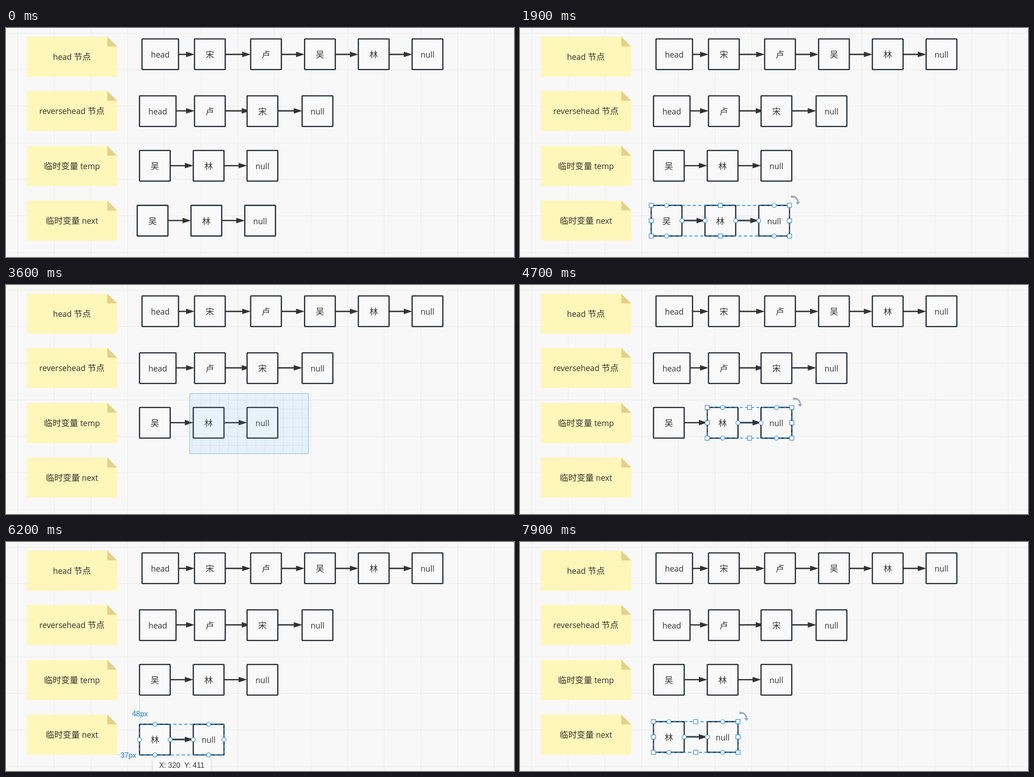
Recreate the animation shown at these times as an HTML page. Size 1113 by 503 pixels, loop 8000 ms.

```html
<!DOCTYPE html>
<html lang="zh">
<head>
<meta charset="utf-8">
<title>Linked list reversal</title>
<style>
  html, body { margin: 0; width: 100%; height: 100%; overflow: hidden; background: #f8f8f8; }
  svg { display: block; }
  text { fill: #323232; text-anchor: middle; white-space: pre;
         font: 17.5px "Open Sans", "Noto Sans", sans-serif; }
  .cjk { font: 300 18.7px "Noto Sans CJK SC", "Noto Sans CJK", sans-serif; }
  .ui { font: 16px "Liberation Sans", Arial, sans-serif; }
  .gap { fill: #0a7fe5; stroke: #f8f8f8; stroke-width: 3; paint-order: stroke; }
  .node { fill: #f9f9f9; stroke: #1e2a35; stroke-width: 2.6; stroke-linejoin: round; }
  .line { stroke: #323232; stroke-width: 2.8; }
  .head { fill: #323232; }
  .glow { stroke: #b3d5f8; stroke-width: 5; }
  .knob { fill: #fff; stroke: #1585e8; stroke-width: 1.2; }
  .dash { fill: none; stroke: #1585e8; stroke-width: 1.6; stroke-dasharray: 7 5; }
  .guide { stroke: #7fa9d2; stroke-width: 1; stroke-dasharray: 2 2; }
  .grid { fill: none; stroke: #e9e9e9; }
  .fine { fill: none; stroke: #e4e4e4; }
  .marquee { fill: rgba(60, 185, 255, .1); stroke: #74b4ec; }
  .turn { fill: none; stroke: #95a5bd; stroke-width: 3; }
  .tip { fill: #95a5bd; }
</style>
</head>
<body>
<svg width="1113" height="503" viewBox="0 0 1113 503">
  <defs>
    <filter id="soft" x="-20%" y="-40%" width="140%" height="180%">
      <feDropShadow dx="0" dy="1" stdDeviation="3" flood-color="#000" flood-opacity=".16"/>
    </filter>
  </defs>
  <rect width="1113" height="503" fill="#f8f8f8"/>
  <g id="grid"></g>
  <g id="under"></g>
  <g id="fixed"></g>
  <g id="scene"></g>
</svg>
<script>
const LOOP = 8000, STEP = 100, SIZE = 67.3, PITCH = 117.8, SCALE = 4 / 3;
const CELL = 80.35, ORIGIN = { x: 25.4, y: 11 };
const TEMP = { x: 292.5, y: 269 }, NEXT = { x: 287.5, y: 389.6 };
const TAIL = { x: TEMP.x + PITCH, y: TEMP.y };
const NOTE = { x: 45.5, w: 198, h: 88 };
const layer = id => document.getElementById(id);

// ---- drawing helpers ----
const line = (cls, x1, y1, x2, y2) =>
  `<line class="${cls}" x1="${x1}" y1="${y1}" x2="${x2}" y2="${y2}"/>`;
const rect = (cls, x, y, w, h, extra = '') =>
  `<rect class="${cls}" x="${x}" y="${y}" width="${w}" height="${h}" ${extra}/>`;
const knob = (x, y) => `<circle class="knob" cx="${x}" cy="${y}" r="4.6"/>`;
const handle = (x, y) => rect('knob', x - 4.6, y - 4.6, 9.2, 9.2);

function label(str, x, y) {
  const parts = str.replace(/[\u4e00-\u9fff]+/g, s => `<tspan class="cjk">${s}</tspan>`);
  return `<text x="${x}" y="${y}">${parts}</text>`;
}

function arrow(x1, x2, y, glow) {
  return (glow ? line('glow', x1, y, x2 - 4, y) : '') +
    line('line', x1, y, x2 - 16, y) +
    `<path class="head" d="M${x2} ${y}l-18.5 -6v12z"/>`;
}

const node = (str, x, y, w = SIZE) =>
  rect('node', x, y, w, SIZE, 'rx="1"') + label(str, x + w / 2, y + 41);

function note(str, y) {
  const { x, w, h } = NOTE, f = 21.5, r = x + w;
  return `<path fill="#fff6b9" d="M${x} ${y}H${r - f}L${r} ${y + f}V${y + h}H${x}z"/>` +
    `<path fill="#e5d088" d="M${r - f} ${y}V${y + f}H${r}z"/>` +
    label(str, x + w / 2, y + 51);
}

function chain(names, { x, y }, glow) {
  const at = i => x + i * PITCH;
  const links = names.slice(1).map((_, i) =>
    arrow(at(i) + SIZE, at(i + 1), y + SIZE / 2 - .3, glow));
  return links.join('') + names.map((n, i) => node(n, at(i), y)).join('');
}

const anchors = (x, y, w, h) =>
  knob(x + w / 2, y) + knob(x + w / 2, y + h) + knob(x, y + h / 2) + knob(x + w, y + h / 2);

const turnIcon = (x, y) => `<g transform="translate(${x} ${y})">` +
  '<path class="turn" d="M6 -19.5A12 12 0 0 1 18.5 -6"/>' +
  '<path class="tip" d="M3 -16.5l1 -6.5l5.5 6z"/>' +
  '<path class="tip" d="M13.5 -7.5l10 .5l-5.5 5.5z"/></g>';

function selection(count, { x, y }, phase, handles) {
  const w = (count - 1) * PITCH + SIZE, h = SIZE;
  let out = rect('dash', x, y, w, h, `stroke-dashoffset="${-phase}"`);
  for (let i = 0; i < count; i++) out += anchors(x + i * PITCH, y, SIZE, h);
  if (!handles) return out;
  for (const i of [0, .5, 1])
    for (const j of [0, .5, 1])
      if (i !== .5 || j !== .5) out += handle(x + w * i, y + h * j);
  return out + turnIcon(x + w, y);
}

function dragInfo({ x, y }) {
  const cx = x + (PITCH + SIZE) / 2, bottom = y + SIZE;
  const side = NOTE.x + NOTE.w, top = TEMP.y + SIZE;
  const X = Math.round(320 + (x - TEMP.x) / SCALE);
  const Y = Math.round(411 + (y - 400.4) / SCALE);
  let out = '';
  if (Math.abs(x - TEMP.x) < 1)
    out += line('guide', x + .5, top, x + .5, y) +
      `<text class="ui gap" x="${x + 1}" y="${(top + y) / 2 + 14.5}">${Math.round((y - top) / SCALE)}px</text>`;
  if (Math.abs(bottom - 467.7) < 1)
    out += line('guide', side, 467.5, x, 467.5) +
      `<text class="ui gap" x="${(side + x) / 2}" y="473.5">${Math.round((x - side) / SCALE)}px</text>`;
  return out +
    rect('', cx - 63, bottom + 6, 126, 34, 'rx="4" fill="#fbfbfb" filter="url(#soft)"') +
    `<text class="ui" x="${cx}" y="${bottom + 28.5}">X: ${X}\u00a0 Y: ${Y}</text>`;
}

// ---- motion helpers ----
const within = (t, a, b) => t >= a && t < b;

function track(keys, t, ease = k => k) {
  if (t <= keys[0][0]) return { x: keys[0][1], y: keys[0][2] };
  for (let i = 1; i < keys.length; i++) {
    const [t0, x0, y0] = keys[i - 1], [t1, x1, y1] = keys[i];
    if (t <= t1) {
      const k = ease((t - t0) / (t1 - t0));
      return { x: x0 + (x1 - x0) * k, y: y0 + (y1 - y0) * k };
    }
  }
  const end = keys[keys.length - 1];
  return { x: end[1], y: end[2] };
}
const smooth = k => k * k * (3 - 2 * k);

const MARQUEES = [
  { from: 700, to: 1200, x: 276.5, y: 350.5,
    keys: [[700, 330, 388], [800, 430, 458], [900, 504.5, 477.5], [1000, 585, 479.5], [1100, 626.5, 479.5]] },
  { from: 3300, to: 3800, x: 402.5, y: 238.5,
    keys: [[3300, 470, 275], [3400, 560, 328], [3500, 635, 364], [3600, 662.5, 370.5]] }
];
const COPY = [[5500, TAIL.x + 26.8, TAIL.y + 26.8], [6200, 292.5, 400.4],
  [6400, 292.5, 400.4], [6900, 292.5, 394.6]];

function marqueeAt(t) {
  const m = MARQUEES.find(m => within(t, m.from, m.to));
  if (!m) return null;
  const end = track(m.keys, t);
  return { x: m.x, y: m.y, w: end.x - m.x, h: end.y - m.y };
}

function gridPath(x, y, w, h, cell) {
  let d = '';
  const first = (v, o) => o + Math.ceil((v - o) / cell) * cell;
  for (let gx = first(x, ORIGIN.x); gx < x + w; gx += cell) d += `M${Math.floor(gx) + .5} ${y}v${h}`;
  for (let gy = first(y, ORIGIN.y); gy < y + h; gy += cell) d += `M${x} ${Math.floor(gy) + .5}h${w}`;
  return d;
}

// ---- scene ----
function drawFixed() {
  layer('grid').innerHTML = `<path class="grid" d="${gridPath(0, 0, 1113, 503, CELL)}"/>`;
  let out = note('head 节点', 19) + note('reversehead 节点', 138.3) +
    note('临时变量 temp', 259) + note('临时变量 next', 379.3);
  for (const [a, b] of [[378, 413], [480, 536], [604, 654], [721, 772], [839, 890]])
    out += arrow(a, b, 58);
  for (const [a, b] of [[373, 413], [480, 535], [596, 649]]) out += arrow(a, b, 182);
  out += node('head', 298, 24, 80);
  [['宋', 413], ['卢', 536], ['吴', 654.2], ['林', 772], ['null', 889.8]]
    .forEach(([s, x]) => out += node(s, x, 24));
  out += node('head', 292.5, 149, 80);
  [['卢', 413], ['宋', 528.2], ['null', 648.8]].forEach(([s, x]) => out += node(s, x, 149));
  layer('fixed').innerHTML = out;
}

function draw(t) {
  const phase = t / STEP % 12;
  const nextPicked = within(t, 1200, 2100), tailPicked = within(t, 3800, 5200);
  const dragging = within(t, 5600, 7200);
  const m = marqueeAt(t);
  let out = chain(['吴', '林', 'null'], TEMP);

  if (t < 2100) out += chain(['吴', '林', 'null'], NEXT, nextPicked);
  if (nextPicked) out += selection(3, NEXT, phase, true);
  if (tailPicked)
    out += chain(['林', 'null'], TAIL, true) + selection(2, TAIL, phase, true);
  if (t >= 5200) {
    const p = track(COPY, t, smooth);
    out += chain(['林', 'null'], p, true);
    if (dragging) out += dragInfo(p);
    out += selection(2, p, phase, !dragging);
  }

  if (within(t, 400, 500)) out += anchors(NOTE.x, 379.3, NOTE.w, NOTE.h);
  if (within(t, 2600, 2800) || within(t, 7500, 7700))
    out += anchors(TAIL.x, TAIL.y, SIZE, SIZE);

  if (m) out += rect('marquee', m.x, m.y, m.w, m.h);
  layer('under').innerHTML = m
    ? `<path class="fine" d="${gridPath(m.x, m.y, m.w, m.h, CELL / 4)}"/>` : '';
  layer('scene').innerHTML = out;
}

const start = performance.now();
let last = -1;
function tick() {
  const t = Math.floor((performance.now() - start) % LOOP / STEP) * STEP;
  if (t !== last) draw(last = t);
  requestAnimationFrame(tick);
}
drawFixed();
tick();
</script>
</body>
</html>
```
